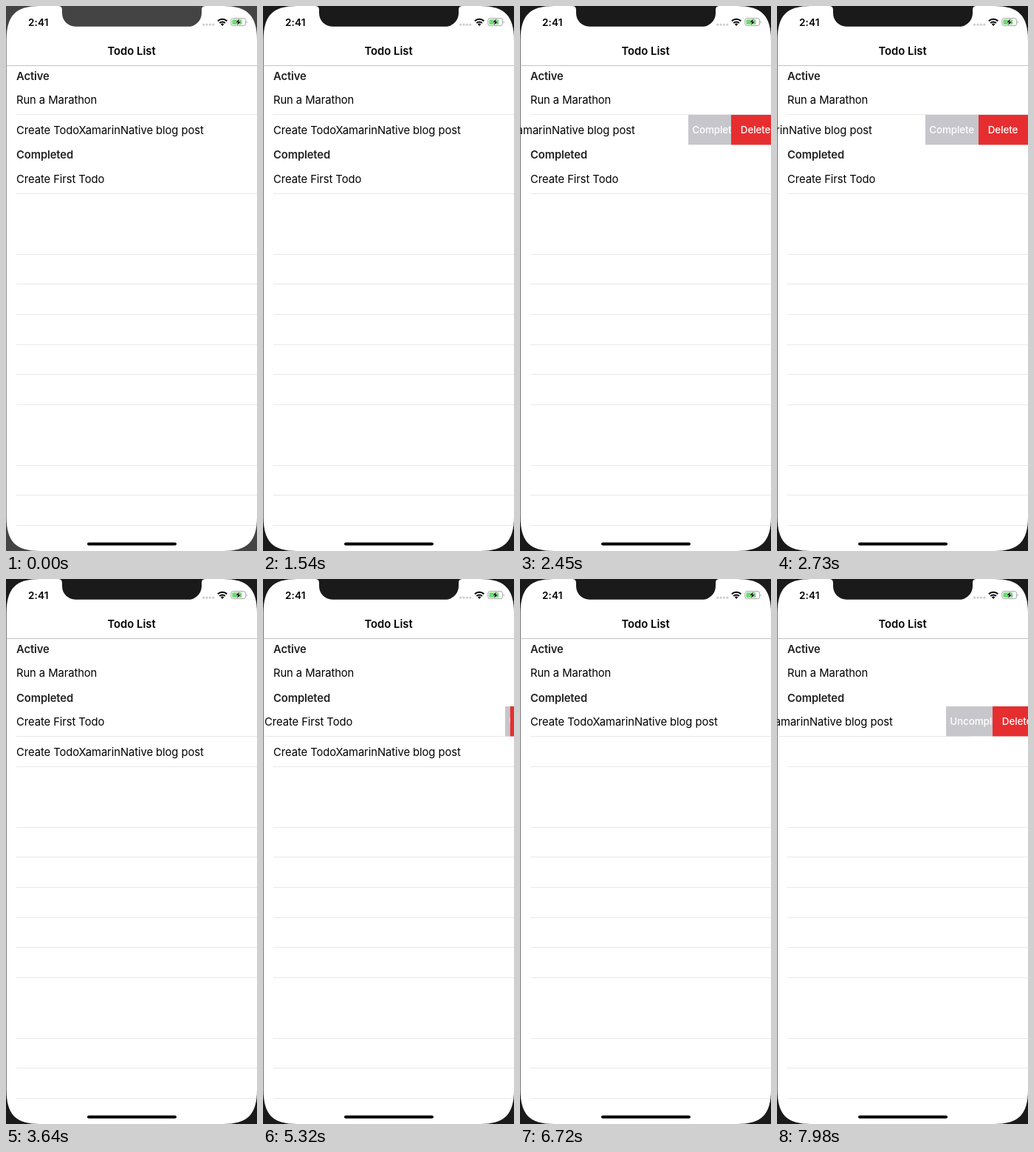
An HTML page that plays this animation: 340x736 px, repeating every 8000 ms.

```html
<!DOCTYPE html>
<html lang="en">
<head>
<meta charset="utf-8">
<title>Todo List</title>
<style>
  html, body { margin: 0; width: 100%; height: 100%; overflow: hidden; background: #1a1a1a; }
  svg { display: block; width: 340px; height: 736px; }
  text { font: 400 14.8px Inter, Roboto, sans-serif; letter-spacing: -.08px; white-space: pre; }
  .title { font-weight: 600; letter-spacing: 0; }
  .head { font-weight: 600; letter-spacing: -.12px; fill: #222; }
  .clock { font-weight: 600; font-size: 13.6px; letter-spacing: .1px; }
  .label { font-weight: 500; font-size: 13.4px; letter-spacing: -.1px; fill: #fff; }
  .line { fill: #e9e9eb; }
</style>
</head>
<body>
<svg viewBox="0 0 340 736" xmlns="http://www.w3.org/2000/svg">
  <defs>
    <clipPath id="screen">
      <path d="M.6 46C.6 13 13 0 46 0H294C327 0 340 13 340 46V690C340 723 327 736 294 736H46C13 736 .6 723 .6 690Z"/>
    </clipPath>
  </defs>
  <rect id="bezel" width="340" height="736"/>
  <g clip-path="url(#screen)">
    <rect width="340" height="736" fill="#fff"/>
    <g id="table"></g>
    <rect y="80" width="340" height="1" fill="#c3c3c5"/>
    <text class="title" x="137.5" y="66.4">Todo List</text>
    <text class="clock" x="30" y="26.7">2:41</text>
    <g fill="#cfcfcf">
      <circle cx="267.6" cy="25.2" r="1.6"/><circle cx="272" cy="25.2" r="1.6"/>
      <circle cx="276.4" cy="25.2" r="1.6"/><circle cx="280.8" cy="25.2" r="1.6"/>
    </g>
    <g fill="none" stroke="#000" stroke-width="2.1">
      <path d="M286.9 20.3A8.8 8.8 0 0 1 299.3 20.3"/>
      <path d="M289.3 23A5.4 5.4 0 0 1 296.9 23"/>
    </g>
    <path d="M290.9 24.6A3.1 3.1 0 0 1 295.3 24.6L293.1 27Z"/>
    <rect x="304.8" y="16.6" width="19.8" height="10" rx="2.8" fill="#fff" stroke="#a2a2a2"/>
    <rect x="306.4" y="18.2" width="13" height="6.8" rx="1.3" fill="#6bdc72"/>
    <path d="M325.8 20A2 2 0 0 1 325.8 23.4Z" fill="#a2a2a2"/>
    <path d="M316.6 16.8L310.6 22.2H314L312.4 26.6L318.6 20.9H315.2Z" stroke="#fff" stroke-width=".5"/>
    <rect x="110" y="724.4" width="121" height="4.2" rx="2.1"/>
  </g>
  <path id="notch" d="M70 0C75 0 76 2 76 6V9.6C76 20 84 27.7 94 27.7H247C257 27.7 265 20 265 9.6V6C265 2 266 0 271 0Z"/>
</svg>
<script>
const LOOP = 8000, TICK = 70;
const BLOG = 'Create TodoXamarinNative blog post', FIRST = 'Create First Todo';
const $ = id => document.getElementById(id);

function add(parent, tag, attrs, content) {
  const el = document.createElementNS('http://www.w3.org/2000/svg', tag);
  for (const k in attrs) el.setAttribute(k, attrs[k]);
  if (content) el.textContent = content;
  parent.append(el);
  return el;
}
const group = parent => add(parent, 'g', {});
const label = (parent, y, content, cls = '') => add(parent, 'text', { x: 14, y, class: cls }, content);
const line = (parent, y) => add(parent, 'rect', { x: 14, y, width: 360, height: 1, class: 'line' });

// A row that slides left and uncovers two buttons sharing the space.
function swipeRow(parent, top, title, action, actionWidth, keys) {
  const deleteWidth = 67, total = actionWidth + deleteWidth;
  const row = group(parent);
  label(row, top + 25.5, title);
  if (top > 150) line(row, top + 40);
  const button = (name, fill, pad) => {
    const g = group(parent);
    add(g, 'rect', { y: top, width: 170, height: 40.4, fill });
    add(g, 'text', { x: pad, y: top + 24.8, class: 'label' }, name);
    return g;
  };
  const first = button(action, '#c7c6cb', 5.3);
  const second = button('Delete', '#e62e30', 12.8);
  return t => {
    const open = track(keys, t);
    const shift = (el, x) => el.setAttribute('transform', `translate(${x} 0)`);
    shift(row, -open);
    shift(first, 340 - open);
    shift(second, 340 - open * deleteWidth / total);
  };
}

function track(keys, t) {
  if (t <= keys[0][0]) return keys[0][1];
  for (let i = 1; i < keys.length; i++) {
    const [t0, v0] = keys[i - 1], [t1, v1] = keys[i];
    if (t <= t1) return v0 + (v1 - v0) * (t - t0) / (t1 - t0);
  }
  return keys[keys.length - 1][1];
}

const table = $('table');
label(table, 99.5, 'Active', 'head');
label(table, 132, 'Run a Marathon');
for (let k = 0; k < 12; k++) {
  if (k !== 1 && k !== 8) line(table, Math.round(253.22 + 40.7 * k));
}

const scenes = [
  { from: 0, build(g) {
    line(g, 146);
    label(g, 206.4, 'Completed', 'head');
    label(g, 238.5, FIRST);
    return swipeRow(g, 147, BLOG, 'Complete', 72,
      [[1610, 0], [1680, 2], [1750, 2], [1820, 8], [2170, 68], [2590, 134], [2730, 139], [2870, 139.4]]);
  } },
  { from: 3570, build(g) {
    label(g, 165.5, 'Completed', 'head');
    label(g, 238.5, BLOG);
    return swipeRow(g, 172, FIRST, 'Uncomplete', 88,
      [[5250, 0], [5320, 12], [5670, 78], [5810, 78], [6230, 135], [6580, 155]]);
  } },
  { from: 6720, build(g) {
    label(g, 165.5, 'Completed', 'head');
    return swipeRow(g, 172, BLOG, 'Uncomplete', 88,
      [[7700, 0], [7770, 30], [7910, 30], [7980, 111]]);
  } }
];
for (const s of scenes) {
  s.el = group(table);
  s.update = s.build(s.el);
}

function draw(ms) {
  const t = Math.floor((ms % LOOP) / TICK + 1e-6) * TICK;
  const current = scenes.filter(s => s.from <= t).pop();
  for (const s of scenes) s.el.setAttribute('display', s === current ? 'inline' : 'none');
  current.update(t);
  const dark = t < 1540 ? '#444' : '#1a1a1a';
  $('bezel').setAttribute('fill', dark);
  $('notch').setAttribute('fill', dark);
}

const start = performance.now();
function frame() {
  draw(performance.now() - start);
  requestAnimationFrame(frame);
}
frame();
</script>
</body>
</html>
```
